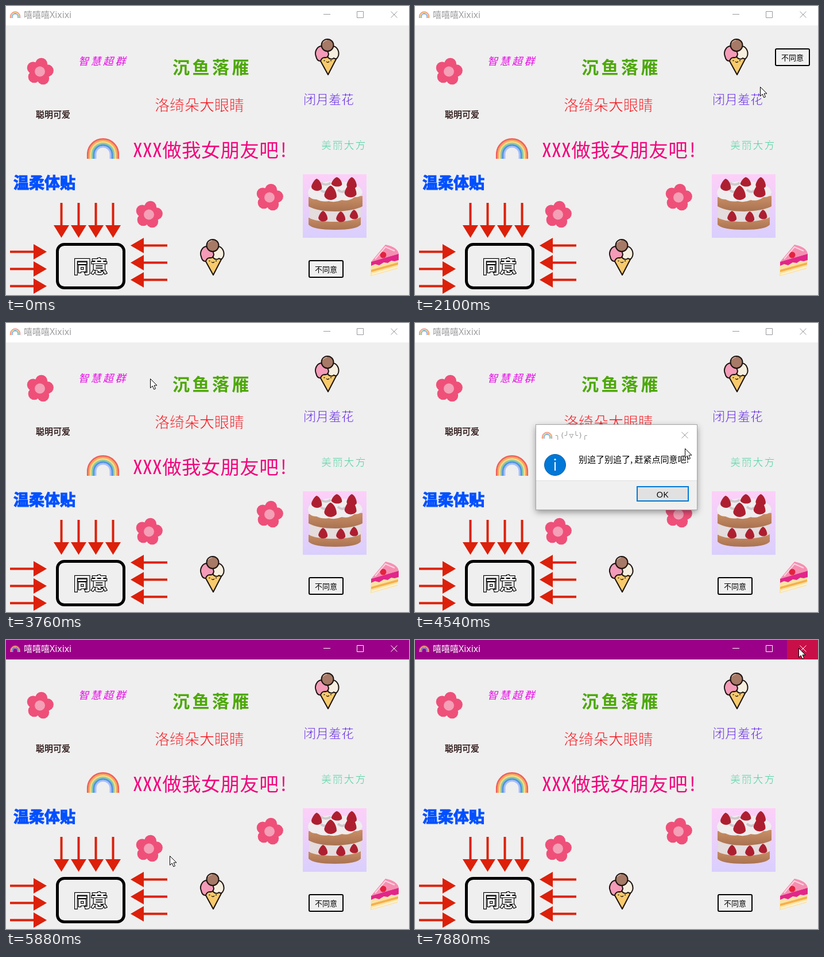
Recreate the animation shown at these times as an HTML page. Size 702 px wide and 505 px high, loop 8 s.

```html
<!DOCTYPE html>
<html lang="zh-CN">
<head>
<meta charset="utf-8">
<style>
html, body { margin: 0; width: 100%; height: 100%; overflow: hidden; background: #efefef; }
svg { display: block; width: 702px; height: 505px; }
text { font-family: "Noto Sans CJK SC", "Noto Sans CJK", sans-serif; white-space: pre; }
.thin { stroke: #efefef; stroke-width: .7px; }
.mono { font-family: "Noto Sans Mono CJK SC", "Noto Sans CJK SC", "Noto Sans CJK", monospace; }
.face { font-family: "DejaVu Sans Mono", monospace; }
.ui { font-family: "Open Sans", "Noto Sans", sans-serif; }
</style>
</head>
<body>
<svg viewBox="0 0 702 505">
  <defs>
    <linearGradient id="sky" x2="0" y2="1">
      <stop stop-color="#fdd0f8"/><stop offset="1" stop-color="#d9cffd"/>
    </linearGradient>
    <linearGradient id="sponge" x2="0" y2="1">
      <stop stop-color="#c98f66"/><stop offset="1" stop-color="#a97250"/>
    </linearGradient>
    <filter id="shadow" x="-10%" y="-15%" width="120%" height="135%">
      <feDropShadow dx="0" dy="4" stdDeviation="6" flood-opacity=".4"/>
    </filter>
    <g id="rainbow" fill="none" stroke-width="3"></g>
    <g id="flower" fill="#ee5079"></g>
    <path id="arrow" d="M-2 0H2V39H13.5L0 61L-13.5 39H-2Z" fill="#dc200a"/>
    <path id="berry" d="M0 -9C5 -8 9 2 8 6Q4 11 -3 9Q-10 6 -7 0Q-4 -7 0 -9Z" fill="#ad1f30"/>
    <g id="cone" stroke="#1c1210" stroke-width="2" stroke-linejoin="round">
      <path d="M6 32L23 63L39 32Q22 24 6 32Z" fill="#f8ca6c"/>
      <path d="M29 13C39 12 43 23 41 30Q38 38 33 34Q28 38 23 33L19 20Z" fill="#f6efdf"/>
      <path d="M11 13C3 14 -1 24 2 31Q4 40 10 39Q12 33 17 33Q23 34 24 27L21 18Z" fill="#f39bb8"/>
      <circle cx="22" cy="11.500" r="10.500" fill="#a67a66"/>
      <path d="M14 7q3 -4 7 -4" fill="none" stroke="#d1ada0" stroke-width="1.5"/>
      <path d="M20 40q2 3 5 0M15.500 38.500h2M27 38.500h2" fill="none" stroke-width="1.300"/>
    </g>
  </defs>

  <rect width="702" height="505" fill="#efefef"/>
  <rect id="bar" width="702" height="34"/>
  <rect id="hot" x="648" width="54" height="34" fill="#c80f48"/>
  <use href="#rainbow" transform="translate(16 21) scale(.32)"/>
  <text id="title" x="31" y="21" font-size="15">嘻嘻嘻<tspan class="ui" font-size="16">Xixixi</tspan></text>
  <path id="controls" d="M553 14.500h12M611.500 9.500h11v11h-11ZM670.500 9.500l11 11M681.500 9.500l-11 11" fill="none"/>

  <use href="#flower" x="59" y="114.500"/>
  <use href="#flower" x="249" y="364.500"/>
  <use href="#flower" x="459" y="334.500"/>
  <use href="#rainbow" x="169" y="267"/>
  <use href="#cone" x="538" y="57"/>
  <use href="#cone" x="338" y="407"/>
  <g id="arrows"></g>

  <text x="126" y="103" font-size="18" letter-spacing="3.500" font-style="italic" fill="#e80ce8">智慧超群</text>
  <text x="290" y="118" font-size="30" letter-spacing="4.500" font-weight="700" fill="#4da808">沉鱼落雁</text>
  <text class="thin" x="259" y="183" font-size="26" fill="#f5141c">洛绮朵大眼睛</text>
  <text class="thin" x="518" y="171" font-size="22" fill="#5a18e6">闭月羞花</text>
  <text class="thin" x="549" y="250" font-size="18" letter-spacing="1.800" fill="#2fcc92">美丽大方</text>
  <text x="52" y="195" font-size="15" fill="#200808" stroke="#200808" stroke-width=".3">聪明可爱</text>
  <text x="13" y="319" font-size="27" font-weight="900" fill="#0050ff" stroke="#0050ff" stroke-width="1.200">温柔体贴</text>
  <text class="mono" x="221" y="263.500" font-size="33.500" letter-spacing=".3" fill="#f2057c">XXX做我女朋友吧!</text>

  <g>
    <rect x="517" y="294" width="111" height="111" fill="url(#sky)"/>
    <path d="M527 370V382Q535 391 573 391Q611 391 618 382V368Z" fill="url(#sponge)"/>
    <path d="M528 352H618V369Q605 376 574 377Q538 377 528 370Z" fill="#e4dcdd"/>
    <use href="#berry" transform="translate(552 367)"/>
    <use href="#berry" transform="translate(583 368)"/>
    <use href="#berry" transform="translate(606 364) scale(.9)"/>
    <path d="M527 334V350Q543 359 574 359Q606 358 621 350V332Z" fill="url(#sponge)"/>
    <path d="M526 326Q528 307 573 306Q618 307 621 326Q618 335 607 334Q597 342 585 339Q573 344 562 341Q551 343 541 338Q527 338 526 326Z" fill="#f0edee"/>
    <path d="M548 321q6 6 8 2M578 321q8 7 13 1M548 309q9 6 18 0" fill="none" stroke="#cfc9ce" stroke-width="4"/>
    <use href="#berry" transform="translate(541 312) scale(1.150)"/>
    <use href="#berry" transform="translate(576 307) scale(1.150 .9)"/>
    <use href="#berry" transform="translate(602 309) scale(1.100)"/>
    <use href="#berry" transform="translate(565 326) scale(1.350)"/>
    <use href="#berry" transform="translate(600 322) scale(1.300)"/>
  </g>

  <g>
    <path d="M636 447L661 417Q682 421 684 433Z" fill="#f58fb2"/>
    <path d="M636 447L684 433L682 459L635 472Z" fill="#fbe3a4"/>
    <path d="M636 447L684 433V444L677 446L671 445L665 449L658 448L650 453L643 451L636 454Z" fill="#e2268a"/>
    <path d="M636 461L683 448V452L636 465Z" fill="#f6b04c"/>
    <path d="M637 469L682 456" stroke="#fff3d8" stroke-width="2"/>
    <circle cx="657" cy="435" r="5.500" fill="#e3233f"/>
    <path d="M643 442L661 421L677 428" fill="none" stroke="#ffd3df" stroke-width="2"/>
  </g>

  <rect x="89.500" y="416.500" width="116" height="76" rx="12" fill="none" stroke="#000" stroke-width="5"/>
  <text x="118" y="466" font-size="29.500" font-weight="700" fill="#fff" stroke="#000" stroke-width="2.400" paint-order="stroke">同意</text>

  <g id="no">
    <rect x="1" y="1" width="59" height="29" rx="2" fill="#f0f0f0" stroke="#000" stroke-width="2"/>
    <text x="11" y="20.500" font-size="13">不同意</text>
  </g>

  <g id="dialog">
    <rect x="210.500" y="177.500" width="281" height="149" fill="#fff" filter="url(#shadow)"/>
    <rect id="dbar" x="211" y="178" width="280" height="37"/>
    <rect x="211" y="275" width="280" height="51" fill="#f0f0f0"/>
    <path d="M211 275.500h280" stroke="#dfdfdf"/>
    <rect id="frame" x="210.500" y="177.500" width="281" height="149" fill="none"/>
    <use href="#rainbow" transform="translate(230 202) scale(.32)"/>
    <text id="dtitle" class="face" x="245" y="201" font-size="13">╮(╯▽╰)╭</text>
    <path id="dclose" d="M464.500 190.500l11 11M475.500 190.500l-11 11" stroke="#999"/>
    <circle cx="244" cy="248" r="18.500" fill="#0078d7" stroke="#0b5fa8"/>
    <path d="M244 243v15" stroke="#fff" stroke-width="2"/>
    <circle cx="244" cy="238.500" r="1.600" fill="#fff"/>
    <text x="285" y="244" font-size="15">别追了别追了, 赶紧点同意吧!</text>
    <rect id="ok"/>
    <text class="ui" x="431" y="305" font-size="15" text-anchor="middle">OK</text>
  </g>

  <path id="cursor" d="M.5 .5V16.500L4.200 13L6.800 19L9.500 17.800L7 12H12Z" fill="#fff" stroke="#000"/>
</svg>
<script>
const $ = id => document.getElementById(id);
const set = (id, attrs) => { for (const k in attrs) $(id).setAttribute(k, attrs[k]); };
const show = (id, on) => set(id, { visibility: on ? "visible" : "hidden" });

$("rainbow").innerHTML = ["#f0605c", "#f7a75f", "#f6db80", "#86cba6", "#4f92e6", "#a9bdfa"]
  .map((c, i) => {
    const r = 26.6 - i * 2.7;
    return `<path d="M${-r} 0V-8A${r} ${r} 0 0 1 ${r} -8V0" stroke="${c}"/>`;
  }).join("");

$("flower").innerHTML = [0, 1, 2, 3, 4].map(i => {
  const a = (i * 72 - 79) * Math.PI / 180;
  return `<circle cx="${13.5 * Math.cos(a)}" cy="${13.5 * Math.sin(a)}" r="10.5"/>`;
}).join("") + '<circle r="9" fill="#f4a0b6"/>';

const arrow = (x, y, turn, k = 1) =>
  `<use href="#arrow" transform="translate(${x} ${y}) rotate(${turn}) scale(1 ${k})"/>`;
for (let i = 0; i < 4; i++) {
  $("arrows").innerHTML += arrow(96.5 + 30 * i, 344, 0);
  if (i < 3) $("arrows").innerHTML += arrow(7, 429.5 + 30 * i, -90, 1.05) + arrow(281, 418.5 + 30 * i, 90, 1.05);
}

// [time, x, y]
const pointer = [
  [220, 600, 505], [500, 572, 470], [1000, 260, 320], [1335, 111, 240],
  [1760, 395, 400], [2200, 625, 110], [2780, 487, 362], [3100, 440, 400],
  [3540, 292, 142], [3760, 250, 96], [4100, 420, 190], [4550, 470, 219],
  [5220, 428, 307], [5360, 428, 307], [6220, 214, 412], [6780, 506, 288],
  [7100, 560, 100], [7880, 668, 14]
];
const jumps = [
  [0, 527, 444], [440, 37, 214], [1420, 407, 404], [1760, 627, 74],
  [2250, 407, 404], [3000, 217, 114], [3760, 527, 444]
];

function glide(keys, t) {
  const i = keys.findIndex(k => k[0] > t);
  if (i < 0) return keys.at(-1).slice(1);
  if (i === 0) return keys[0].slice(1);
  const a = keys[i - 1], b = keys[i];
  const p = (t - a[0]) / (b[0] - a[0]), e = p * p * (3 - 2 * p);
  return [a[1] + (b[1] - a[1]) * e, a[2] + (b[2] - a[2]) * e];
}

const move = (id, [x, y]) => set(id, { transform: `translate(${Math.round(x)} ${Math.round(y)})` });

function draw(now) {
  // the screen refreshes nine times a second
  const t = Math.floor((now % 8000 + 25) * 9 / 1000) % 72 * 1000 / 9;
  const active = t > 4900, hover = t > 5080;
  const ink = active ? "#fff" : "#999", purple = active ? "#9b0088" : "#fff";

  set("bar", { fill: purple });
  set("title", { fill: ink });
  set("controls", { stroke: ink });
  show("hot", t > 7700);

  show("dialog", t > 4200 && t < 5300);
  set("dbar", { fill: purple });
  set("dtitle", { fill: ink });
  set("frame", { stroke: active ? "#9b0088" : "#a5a5a5" });
  set("dclose", { "stroke-opacity": active ? 0 : 1 });
  set("ok", hover
    ? { x: 386.5, y: 285.5, width: 90, height: 26, fill: "#cfe5f8", stroke: "#005499", "stroke-width": 1 }
    : { x: 387, y: 286, width: 89, height: 25, fill: "#e1e1e1", stroke: "#0078d7", "stroke-width": 2 });

  move("no", jumps.findLast(k => k[0] <= t).slice(1));
  move("cursor", glide(pointer, t));
  show("cursor", t > 220);
  requestAnimationFrame(draw);
}
requestAnimationFrame(draw);
</script>
</body>
</html>
```
